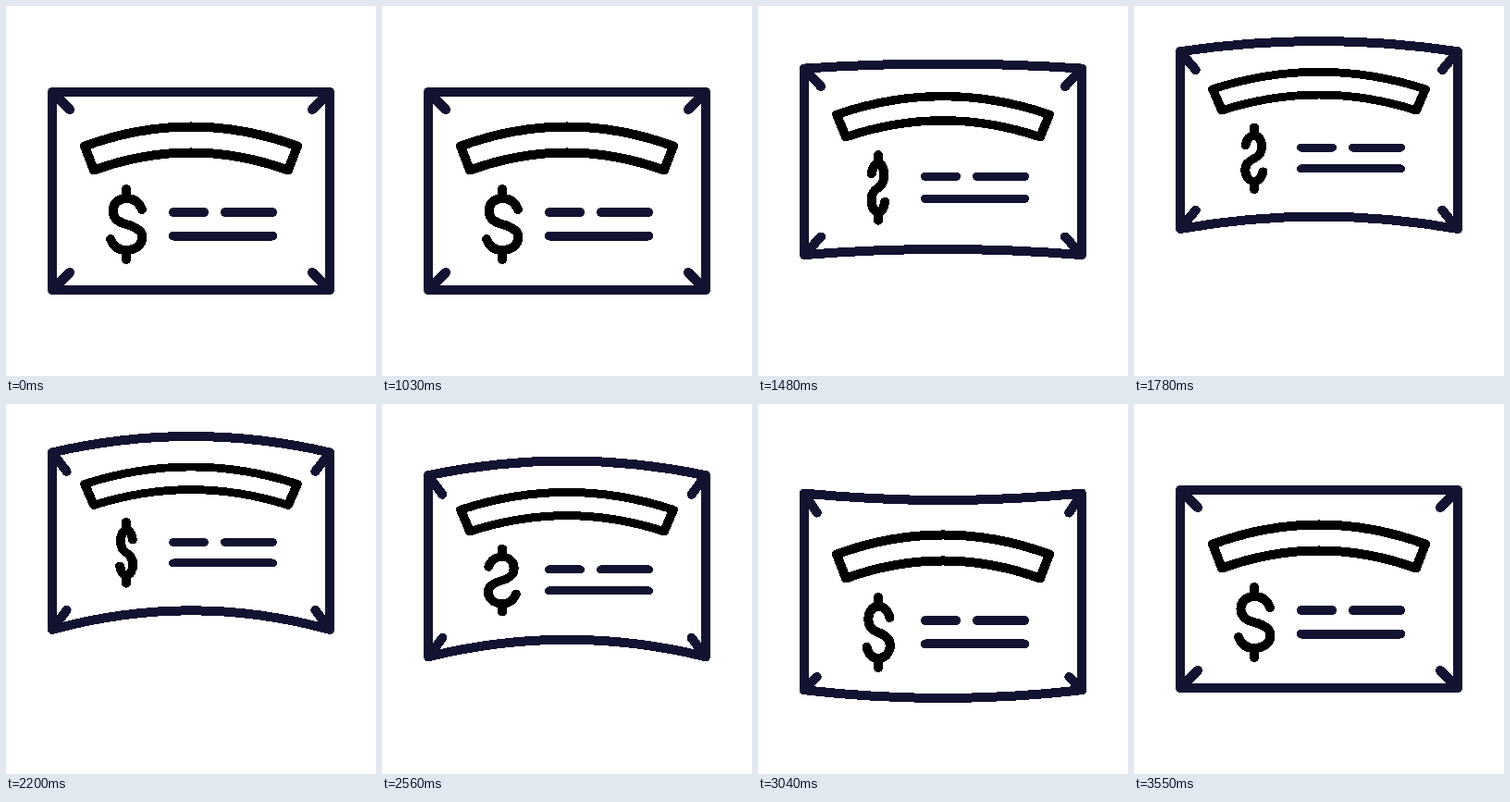
An HTML page for the animation above (3.61 s loop, 400 px wide and 400 px high).

```html
<!DOCTYPE html>
<html lang="en">
<head>
<meta charset="utf-8">
<title>Cheque</title>
<style>
html, body { margin: 0; width: 100%; height: 100%; overflow: hidden; background: #fff; }
svg { display: block; width: 100vw; height: 100vh; shape-rendering: crispEdges; }
path { fill: none; stroke-width: 10; stroke-linecap: round; stroke-linejoin: round; }
.navy { stroke: #121331; }
.black { stroke: #000; }
</style>
</head>
<body>
<svg viewBox="0 0 400 400">
  <path id="card" class="navy"/>
  <path id="ticks" class="navy"/>
  <g id="content">
    <path class="navy" d="M181 223H214M237 223H288M181 248.5H288"/>
    <path class="black" d="M85 151.5Q200 109.5 315 151.5L305 177.5Q200 139.5 95 177.5Z"/>
    <path id="dollar" class="black"/>
  </g>
</svg>
<script>
const LOOP = 3610, START = 1030, END = 3550, STEP = 30;
const PEAK = 1900, FALL = 2340, LAND = 2870;
const TOP = 93, HEIGHT = 214, LEFT = 50, RIGHT = 350;

// Right half of the S curve etc., in x measured from the coin sign's axis.
const DOLLAR = `M0 198 L0 208 M0 264 L0 274 M17 220
  C14 212 8 208 0 208 C-9 208 -14.5 214 -14.5 221.5
  C-14.5 230 -9 233.5 0 236 C11 239 17.5 243 17.5 250
  C17.5 258 10 264 0 264 C-9 264 -14 260 -17 252`;

const el = id => document.getElementById(id);
const set = (id, d) => el(id).setAttribute("d", d);

// Smooth 0 to 1 between times a and b.
function ease(t, a, b) {
  const u = Math.min(1, Math.max(0, (t - a) / (b - a)));
  return u * u * (3 - 2 * u);
}

// Rises between a and b, returns between c and d.
const pulse = (t, a, b, c, d) => ease(t, a, b) - ease(t, c, d);

function draw(t) {
  const lift = pulse(t, START, PEAK, FALL, LAND);
  const drop = pulse(t, FALL, LAND, LAND, END);
  const squash = 1 - .12 * pulse(t, START, PEAK, 2440, LAND);

  // The card bends a little later than it moves.
  const arch = pulse(t, START, 2300, 2470, 2980);
  const sag = pulse(t, 2470, 2980, 2980, END);
  const bow = arch - .43 * sag;

  const top = TOP - 58 * lift + 13 * drop;
  const low = top + HEIGHT * squash;
  const topEnd = top + 17.7 * bow, lowEnd = low + 21 * bow;
  const mid = (LEFT + RIGHT) / 2;
  set("card", `M${LEFT} ${topEnd}Q${mid} ${2 * top - topEnd} ${RIGHT} ${topEnd}`
    + `V${lowEnd}Q${mid} ${2 * low - lowEnd} ${LEFT} ${lowEnd}Z`);

  const dx = 19 - 3.5 * arch - 5.5 * sag;
  const down = 19 + 1.5 * arch + 2 * sag, up = 19 + 2 * arch - 5 * sag;
  const pair = (y, dy) => `M${LEFT} ${y}l${dx} ${dy}M${RIGHT} ${y}l${-dx} ${dy}`;
  set("ticks", pair(topEnd, down) + pair(lowEnd, -up));

  el("content").setAttribute("transform", `translate(0 ${top - squash * TOP}) scale(1 ${squash})`);

  // Two turns about the upright axis, the last part slow.
  const turns = (671 * ease(t, 900, 3100) + 49 * ease(t, LAND, END)) / 360;
  const face = Math.cos(turns * 2 * Math.PI);
  set("dollar", DOLLAR.replace(/(-?[\d.]+) ([\d.]+)/g,
    (m, x, y) => (130 + face * x).toFixed(2) + " " + y));
}

const origin = performance.now();
function frame() {
  const t = (performance.now() - origin) % LOOP;
  const moved = Math.floor((t - START) / STEP) * STEP;
  draw(Math.min(END, START + Math.max(0, moved)));
  requestAnimationFrame(frame);
}
frame();
</script>
</body>
</html>
```
